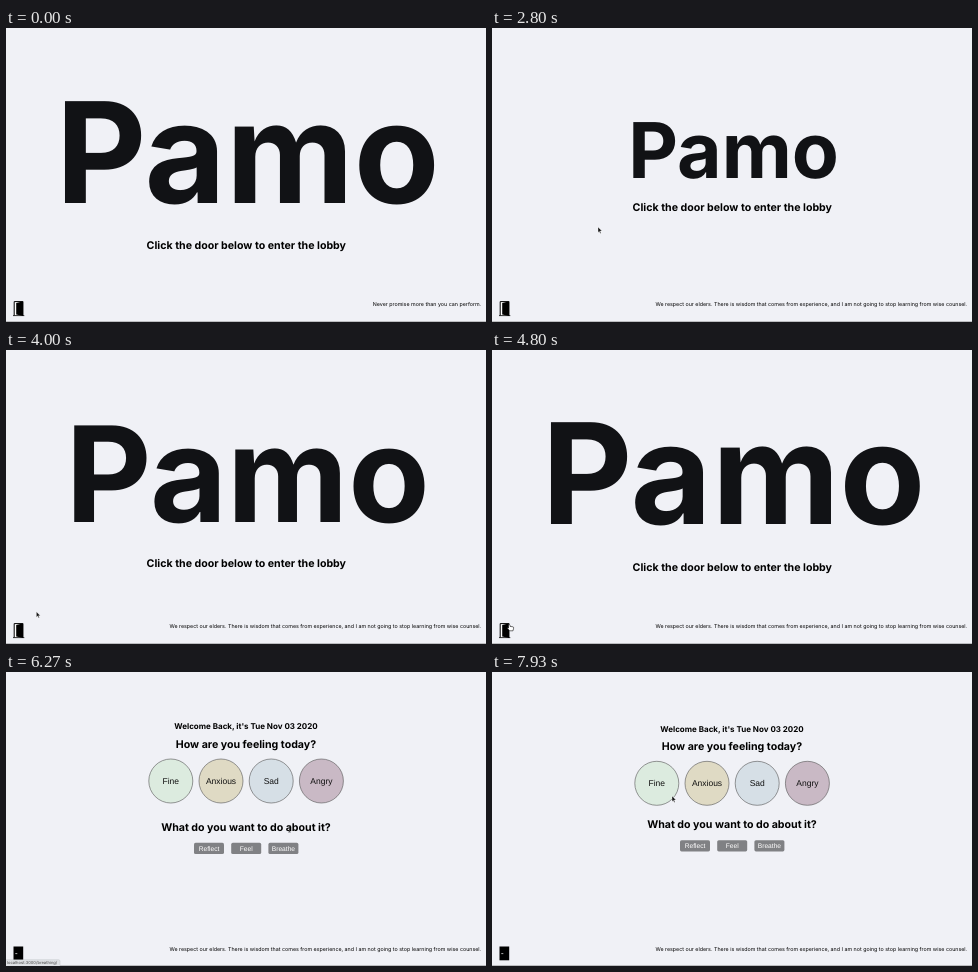
Write an HTML page that moves like this. It is 480 by 294 pixels and loops after 8 s.

```html
<!DOCTYPE html>
<html lang="en">
<head>
<meta charset="utf-8">
<title>Lobby</title>
<style>
  html, body { margin: 0; width: 100%; height: 100%; overflow: hidden; background: #fff; }
  svg { display: block; width: 100vw; height: 100vh; }
  text { font-family: Inter, "Open Sans", sans-serif; text-rendering: geometricPrecision; }
  .mid { text-anchor: middle; }
  .bold { font-weight: 700; }
  .mood, .button { font-family: "Liberation Sans", Arial, sans-serif; }
  .mood { font-size: 8.5px; fill: #111; }
  .button { font-size: 6.67px; fill: #fff; }
</style>
</head>
<body>
<svg viewBox="0 0 480 294">
  <rect id="paper" width="480" height="294" fill="#f0f1f6"/>

  <g id="entry">
    <text id="title" class="mid bold" x="241.6" fill="#111215">Pamo</text>
    <text id="subtitle" class="mid bold" x="240.3" font-size="10.64">Click the door below to enter the lobby</text>
    <path d="M8.2 287.5V273.6H16.8V287.5" fill="#fff" stroke="#000"/>
    <path d="M10.2 275L17.2 273.2V288L10.2 286.5Z"/>
    <path d="M7 287.6H18.3" stroke="#000" stroke-width=".8"/>
  </g>

  <g id="lobby">
    <g id="upper">
      <text class="mid bold" x="240" y="59.5" font-size="8">Welcome Back, it's Tue Nov 03 2020</text>
      <text class="mid bold" x="240" y="78" font-size="10.64">How are you feeling today?</text>
      <g id="moods"></g>
    </g>
    <g id="lower">
      <text class="mid bold" x="240" y="156.2" font-size="10.64">What do you want to do about it?</text>
      <g id="actions"></g>
    </g>
    <rect x="7.5" y="274.5" width="9.7" height="13.8"/>
    <path d="M9.3 281.6H11.3" stroke="#ddd" stroke-width=".8"/>
  </g>

  <text id="quote" x="475.2" font-size="5.33" text-anchor="end"></text>
  <path d="M0 293.5H480" stroke="#bcbdc0"/>

  <g id="status">
    <path id="statusBox" fill="#dfe1e5" stroke="#b9bbc0" stroke-width=".4"/>
    <text id="statusText" x="1" y="292.4" font-size="4.1" fill="#444"></text>
  </g>

  <g id="cursor">
    <path id="arrow" d="M0 0V5.6L1.3 4.4L2.2 6.4L3.1 6L2.2 4.1H4Z" fill="#111" stroke="#fff" stroke-width=".4"/>
    <path id="beam" d="M-1.3-3H1.3M0-3V3M-1.3 3H1.3" fill="none" stroke="#333" stroke-width=".7"/>
    <path id="hand" d="M-1.5 0Q-.6-1.4 0 0V1.4L3 1.8Q3.8 2 3.6 3.2L3 5.8H-.4L-2.6 3.2Q-2.6 2.2-1.5 3Z"
      fill="#fff" stroke="#111" stroke-width=".6"/>
  </g>
</svg>
<script>
const LOOP = 8000;
const BLANK = 1670, RELOAD = 1800, GROW = 1845, GROW_TIME = 3000, ENTER = 5530;
const MAX_SIZE = 140;
const QUOTES = [
  "Never promise more than you can perform.",
  "We respect our elders. There is wisdom that comes from experience, and I am not going to stop learning from wise counsel."
];

// time, x, y
const PATH = [
  [270, 145, 251], [730, 56, 198], [2470, 56, 198], [2800, 106, 199],
  [3330, 54, 237], [3400, 35.5, 255], [3600, 31, 261], [4270, 30, 262],
  [4530, 18, 275], [5600, 18, 275], [6070, 277, 176], [6200, 280, 172],
  [6270, 283.5, 157], [6600, 313, 118], [7270, 315.5, 113], [7930, 180, 124]
];
// time from which each pointer shape applies
const SHAPES = [
  [270, "arrow"], [680, "beam"], [2570, "arrow"], [4430, "hand"],
  [5640, "arrow"], [6030, "hand"], [6230, "beam"], [6400, "arrow"]
];

const $ = id => document.getElementById(id);
const clamp = v => Math.min(1, Math.max(0, v));
const ramp = (t, from, to) => clamp((t - from) / (to - from));
const smooth = p => p * p * (3 - 2 * p);
const show = (id, on) => $(id).setAttribute("display", on ? "inline" : "none");
const set = (id, attrs) => {
  for (const key in attrs) $(id).setAttribute(key, attrs[key]);
};

// CSS "ease": cubic-bezier(.25, .1, .25, 1)
function ease(p) {
  const bezier = (u, a, b) => 3 * u * (1 - u) ** 2 * a + 3 * u * u * (1 - u) * b + u ** 3;
  let low = 0, high = 1;
  for (let i = 0; i < 24; i++) {
    const u = (low + high) / 2;
    if (bezier(u, .25, .25) < p) low = u; else high = u;
  }
  return bezier(low, .1, 1);
}

function pointerAt(t) {
  const next = PATH.findIndex(point => point[0] > t);
  if (next < 0) return PATH[PATH.length - 1].slice(1);
  if (next === 0) return PATH[0].slice(1);
  const [t0, x0, y0] = PATH[next - 1], [t1, x1, y1] = PATH[next];
  const p = smooth(ramp(t, t0, t1));
  return [x0 + (x1 - x0) * p, y0 + (y1 - y0) * p];
}

function drawEntry(t) {
  const size = t < RELOAD ? MAX_SIZE : MAX_SIZE * ease(ramp(t, GROW, GROW + GROW_TIME));
  const missing = MAX_SIZE - size;
  set("title", { "font-size": size, y: 174.5 - .394 * missing });
  set("subtitle", { y: 221.2 - .6 * missing });
}

function drawLobby(t) {
  const open = 1 - smooth(ramp(t, 6330, 6530));
  set("upper", { transform: `translate(0 ${-2.3 * open})` });
  set("lower", { transform: `translate(0 ${2.6 * open})` });
}

function drawStatus(t) {
  const breathing = t >= 6070;
  const width = breathing ? 54 : 45.5;
  const opacity = breathing ? 1 - ramp(t, 6400, 6600)
    : ramp(t, 5130, 5330) * (1 - ramp(t, 5730, 5870));
  set("status", { opacity });
  set("statusBox", { d: `M-1 295V287.7H${width - 1.5}Q${width} 287.7 ${width} 289.2V295Z` });
  $("statusText").textContent = "localhost:3000/" + (breathing ? "breathing/" : "lobby");
}

function drawCursor(t) {
  const [x, y] = pointerAt(t);
  set("cursor", { transform: `translate(${x} ${y})` });
  const current = SHAPES.filter(([start]) => start <= t).pop();
  for (const shape of ["arrow", "beam", "hand"]) show(shape, current && current[1] === shape);
}

function draw(t) {
  const blank = t >= BLANK && t < RELOAD, inLobby = t >= ENTER;
  show("paper", !blank);
  show("entry", !blank && !inLobby);
  show("lobby", inLobby);
  show("quote", !blank);
  $("quote").textContent = QUOTES[t < BLANK ? 0 : 1];
  set("quote", { y: inLobby ? 279.2 : 278.2 });
  drawEntry(t);
  drawLobby(t);
  drawStatus(t);
  drawCursor(t);
}

const moods = { Fine: "#dcebdf", Anxious: "#dfdac4", Sad: "#d6dfe6", Angry: "#c9b9c5" };
$("moods").innerHTML = Object.entries(moods).map(([name, fill], i) => {
  const x = 164.8 + 50.2 * i;
  return `<circle cx="${x}" cy="111.3" r="22" fill="${fill}" stroke="#555" stroke-width=".6"/>
    <text class="mid mood" x="${x}" y="114.3">${name}</text>`;
}).join("");

$("actions").innerHTML = ["Reflect", "Feel", "Breathe"].map((name, i) => {
  const x = 203 + 37.2 * i;
  return `<rect x="${x - 15}" y="168.2" width="30" height="11.2" rx="1.6" fill="#808184"/>
    <text class="mid button" x="${x}" y="176.1">${name}</text>`;
}).join("");

const start = performance.now();
function tick() {
  draw((performance.now() - start) % LOOP);
  requestAnimationFrame(tick);
}
tick();
</script>
</body>
</html>
```
